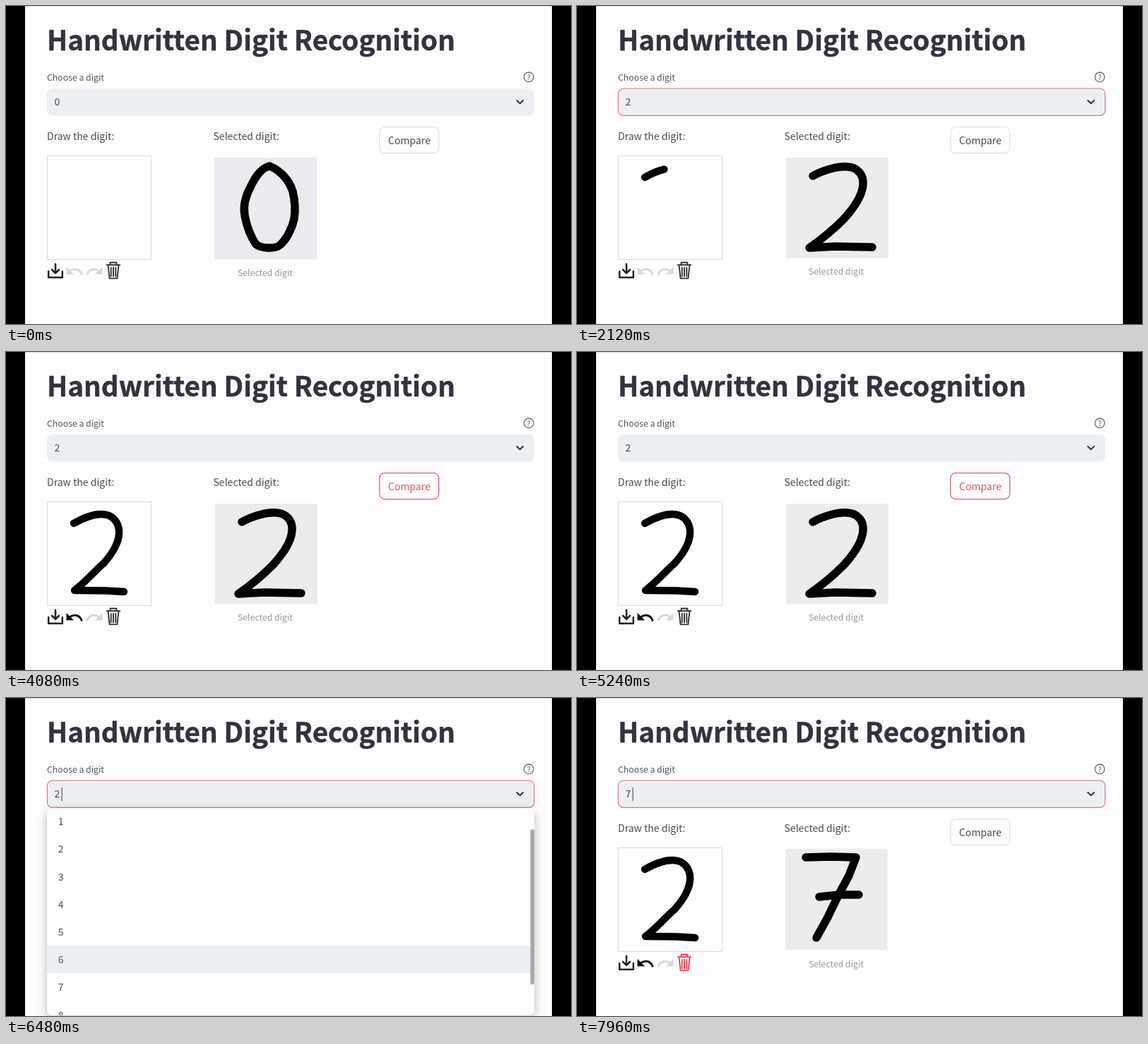
Write an HTML page that moves like this. It is 800 px wide and 451 px high and loops after 8 s.

```html
<!DOCTYPE html>
<html lang="en">
<head>
<meta charset="utf-8">
<title>Handwritten Digit Recognition</title>
<style>
html, body { margin: 0; width: 100%; height: 100%; overflow: hidden; background: #000; }
svg { display: block; width: 800px; height: 451px; }
text { font: 14.04px "Noto Sans CJK JP", "Noto Sans CJK SC", "Noto Sans CJK", "Noto Sans", sans-serif; fill: #4a4b55; }
.title { font-size: 38.65px; font-weight: 700; fill: #31333f; stroke: #31333f; stroke-width: .45px; }
.label { font-size: 12.28px; fill: #54555f; }
.caption { font-size: 12.28px; fill: #98989f; text-anchor: middle; }
.mid { text-anchor: middle; }
.line { fill: none; stroke-linecap: round; stroke-linejoin: round; }
.ink { stroke: #000; stroke-width: 11.5; }
.pen { stroke: #000; stroke-width: 10.4; stroke-dasharray: 100 200; }
.step, .flow { animation: 8s step-end infinite; }
.flow { animation-timing-function: linear; }

.zero-value { animation-name: zero-value; }
.two-value { animation-name: two-value; }
.seven-value { animation-name: seven-value; }
.zero-pic { animation-name: zero-pic; }
.two-pic { animation-name: two-pic; }
.seven-pic { animation-name: seven-pic; }
.focus { animation-name: focus; }
.caret { animation-name: caret; }
.menu { animation-name: menu; }
.list { animation-name: scroll; }
.thumb { animation-name: thumb; }
.bar { animation-name: bar; }
.hover { animation-name: hover; }
.pen { animation-name: draw; }
.undo { animation-name: undo; }
.compare { animation-name: compare; }
.trash { animation-name: trash; }

@keyframes zero-value { 0% { opacity: 1 } 19%, 100% { opacity: 0 } }
@keyframes two-value { 0%, 93.4%, 100% { opacity: 0 } 19% { opacity: 1 } }
@keyframes seven-value { 0% { opacity: 0 } 93.4%, 100% { opacity: 1 } }
@keyframes zero-pic { 0% { opacity: 1 } 20.4%, 100% { opacity: 0 } }
@keyframes two-pic { 0%, 95%, 100% { opacity: 0 } 20.4% { opacity: 1 } }
@keyframes seven-pic { 0% { opacity: 0 } 95%, 100% { opacity: 1 } }
@keyframes focus { 0%, 49.5% { opacity: 0 } 4.9%, 66.4%, 100% { opacity: 1 } }
@keyframes caret {
  0%, 16.4%, 24.4%, 36.9%, 73%, 85.4% { opacity: 0 }
  10.2%, 19%, 30.7%, 66.4%, 79.2%, 93.4%, 100% { opacity: 1 }
}
@keyframes menu {
  0%, 4.5%, 20.5%, 66.1%, 94%, 100% { opacity: 0 }
  6.5%, 18.1%, 68.1%, 91.6% { opacity: 1 }
}
@keyframes scroll {
  0% { transform: none }
  77% { transform: none; animation-timing-function: ease-in-out }
  86%, 100% { transform: translateY(-98px) }
}
@keyframes thumb {
  0% { transform: none }
  77% { transform: none; animation-timing-function: ease-in-out }
  86%, 100% { transform: translateY(73px) }
}
@keyframes bar { 0%, 21%, 100% { opacity: 0 } 6%, 76.5% { opacity: 1 } }
@keyframes hover {
  0% { transform: none }
  10.5% { transform: translateY(39.2px) }
  12% { transform: translateY(78.4px) }
  73% { transform: translateY(117.6px) }
  74% { transform: translateY(156.8px) }
  75% { transform: translateY(196px) }
  80.8% { transform: translateY(235.2px) }
  82.8%, 100% { transform: translateY(274.4px) }
}
@keyframes draw {
  0%, 24.9% { opacity: 0; stroke-dashoffset: 100 }
  25% { opacity: 1; stroke-dashoffset: 100 }
  34.5% { opacity: 1; stroke-dashoffset: 28 }
  37% { opacity: 1; stroke-dashoffset: 11 }
  38.8%, 100% { opacity: 1; stroke-dashoffset: 0 }
}
@keyframes undo { 0% { color: #d8d8dc } 39.5%, 100% { color: #111 } }
@keyframes compare { 0%, 66.4%, 100% { opacity: 0 } 47.9% { opacity: 1 } }
@keyframes trash { 0% { color: #333 } 97.4%, 100% { color: #de4a5a } }
</style>
</head>
<body>
<svg viewBox="0 0 800 451">
  <defs>
    <clipPath id="panel"><rect x="58" y="156" width="690" height="294" rx="7.5"/></clipPath>
    <g id="arrow">
      <path d="M85.5 370V380.5H96Z" fill="currentColor"/>
      <path class="line" d="M89 377C95 371.5 104 372 107 380.5" stroke="currentColor" stroke-width="2.8"/>
    </g>
  </defs>

  <rect width="800" height="451"/>
  <rect x="27" width="746" height="451" fill="#fefdfe"/>
  <rect x="27" width="746" height="1" fill="#dcdcdf"/>

  <text class="title" x="58" y="62.5">Handwritten Digit Recognition</text>
  <text class="label" x="58" y="105.5">Choose a digit</text>
  <circle cx="740.2" cy="100.8" r="6.8" fill="none" stroke="#6d6e77" stroke-width="1.3"/>
  <text class="mid" x="740.2" y="104.6" style="font-size:10px">?</text>

  <text x="58" y="189.9">Draw the digit:</text>
  <text x="293.5" y="189.9">Selected digit:</text>

  <rect x="528.8" y="171.7" width="84" height="37" rx="7.5" fill="#fefdfe" stroke="#dadade"/>
  <text class="mid" x="571" y="195.8">Compare</text>
  <g class="step compare">
    <rect x="528.8" y="171.7" width="84" height="37" rx="7.5" fill="#fefdfe" stroke="#dc5f6d" stroke-width="1.2"/>
    <text class="mid" x="571" y="195.8" style="fill:#dc5566">Compare</text>
  </g>

  <rect x="58.5" y="212.5" width="147" height="147" fill="#fefdfe" stroke="#dadae0"/>
  <path class="line pen flow" pathLength="100" d="M96 243C110 235 125 230 135 230C152 230 161 243 160 258C159 275 146 291 138 300C128 308 116 323 97 338L141 338.5L167 340"/>

  <path class="line" d="M60.2 376.3V385H79.8V376.3M70 366V379M65 374L70 379L75 374" stroke="#222" stroke-width="2.5"/>
  <use class="step undo" href="#arrow"/>
  <use href="#arrow" color="#d8d8dc" transform="matrix(-1 0 0 1 222 0)"/>
  <path class="line step trash" d="M142.8 367.2H161.2M147.6 366.5V363.8H156.4V366.5M144.6 368.5L146.6 386.4H157.4L159.4 368.5M148.7 371V383.4M152 371V383.4M155.3 371V383.4" stroke="currentColor" stroke-width="1.9"/>

  <g class="step zero-pic">
    <rect x="295" y="215" width="145" height="144.5" fill="#ecebef"/>
    <path class="line ink" d="M373 227C361 230 352 244 346 257C338 272 336 286 338 297C341 313 347 328 354 338C361 344 381 345 388 339C397 331 405 316 408 302C410 290 409 276 406 263C402 250 391 234 373 227Z"/>
    <text class="caption" x="367" y="383.3">Selected digit</text>
  </g>
  <g class="step two-pic">
    <rect x="296" y="215" width="145" height="142.5" fill="#ecebee"/>
    <path class="line ink" d="M334 241C350 232 370 227 383 228C398 229 406 240 405 253C404 272 388 291 377 303C364 316 346 331 329 343L365 341L418 342"/>
    <text class="caption" x="367" y="381.2">Selected digit</text>
  </g>
  <g class="step seven-pic">
    <rect x="295" y="214" width="144.5" height="143.5" fill="#ecebee"/>
    <path class="line ink" d="M324 226L360 225L395 226L385 252L371 278L354 313L339 340M343 282L372 279L399 279"/>
    <text class="caption" x="367" y="381.8">Selected digit</text>
  </g>

  <rect x="58" y="117" width="690" height="38.5" rx="7.5" fill="#ecf0f2"/>
  <rect class="step focus" x="58.4" y="117" width="689.4" height="38.4" rx="7.5" fill="none" stroke="#e07480" stroke-width="1.2"/>
  <text class="step zero-value" x="68.6" y="141.4">0</text>
  <text class="step two-value" x="68.6" y="141.4">2</text>
  <text class="step seven-value" x="68.6" y="141.4">7</text>
  <rect class="step caret" x="78.6" y="127" width="1.1" height="19" fill="#4a4b55"/>
  <path class="line" d="M723.4 134L727.7 138.2L732 134" stroke="#31333f" stroke-width="2"/>

  <g class="flow menu">
    <rect x="58" y="156" width="690" height="294" rx="7.5" fill="#fefdfe" style="filter:drop-shadow(0 4px 7px rgba(0,0,0,.26))"/>
    <g clip-path="url(#panel)">
      <g class="flow list" id="list">
        <rect class="step hover" x="58" y="156" width="684.5" height="39.2" fill="#edf0f2"/>
      </g>
      <g class="step bar">
        <rect class="flow thumb" x="742.5" y="156.5" width="5.5" height="220" rx="2.5" fill="#a6a7a9"/>
      </g>
    </g>
  </g>
</svg>
<script>
const list = document.getElementById("list");
for (let i = 0; i < 10; i++) {
  const row = document.createElementNS(list.namespaceURI, "text");
  row.setAttribute("x", 73.7);
  row.setAttribute("y", 181 + i * 39.2);
  row.textContent = i;
  list.append(row);
}
</script>
</body>
</html>
```
